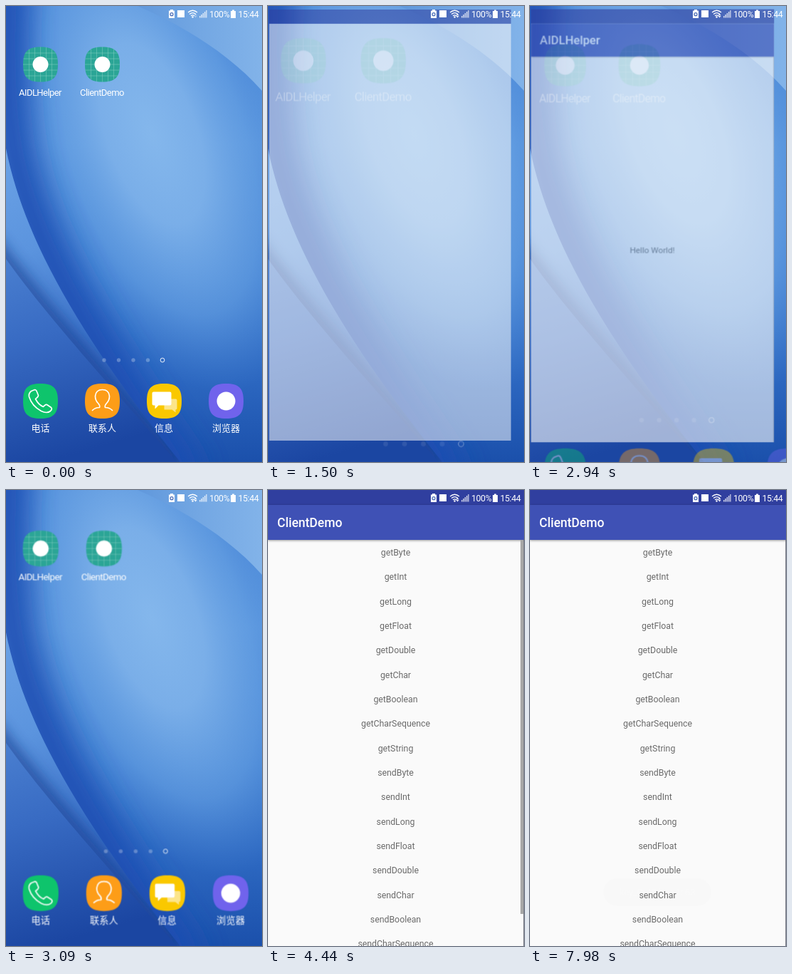
Animation, 360 px wide and 640 px high, one loop 8 s. Source, as an HTML page:

```html
<!DOCTYPE html>
<html lang="zh">
<head>
<meta charset="utf-8">
<title>Phone demo</title>
<style>
html, body { margin: 0; width: 100%; height: 100%; overflow: hidden; background: #2a62b8; }
#stage { position: absolute; left: 0; top: 0; width: 360px; height: 640px; overflow: hidden; font-family: Roboto, sans-serif; }
#stage > svg { position: absolute; left: 0; top: 0; }
text { font-family: Roboto, "Noto Sans CJK SC", "Noto Sans CJK", sans-serif; fill: #fff; }
.label { font-size: 13px; text-anchor: middle; }
.latin { letter-spacing: -.55px; }
.status { font-size: 12.3px; letter-spacing: -.35px; }

.window { position: absolute; inset: 0; background: #fafafa; overflow: hidden; opacity: 0; }
.bar { height: 21px; background: #303f9f; }
.content { position: absolute; top: 21px; left: 0; right: 0; bottom: 0; opacity: 0; }
.toolbar { height: 49px; line-height: 50px; padding-left: 13px; background: #3f51b5; color: #fff;
  font-size: 17.5px; font-weight: 500; box-shadow: 0 1px 3px rgba(0,0,0,.4); }
.item { position: absolute; left: 0; width: 359px; height: 20px; line-height: 20px; text-align: center;
  font-size: 12.3px; color: #6a6a6a; }
.scrollbar { position: absolute; left: 355px; top: 49px; width: 4px; height: 525px; background: #a8a8a8; }
.edge { position: absolute; left: 359px; top: 49px; width: 1px; height: 570px; background: rgba(40,44,60,.55); }
.toast { position: absolute; left: 103px; top: 545px; width: 152px; height: 39px; line-height: 40px;
  border-radius: 20px; background: #636363; color: #fff; text-align: center;
  font-size: 13.4px; letter-spacing: -.4px; white-space: pre; opacity: 0; }

#home, .window, .content, .tap, #arrow { animation: 8s step-end infinite; }
#home { animation-name: home; }
#helper { transform-origin: 30px 91px; animation-name: helper; }
#client { transform-origin: 135px 91px; animation-name: client; }
#helper .content { animation-name: helperContent; }
#client .content { animation-name: clientContent; }
#tap0 { animation-name: tapHelper; }
#tap1 { animation-name: tapClient; }
#arrow { animation-name: arrow; }
.scrollbar { animation: scrollbar 8s linear infinite; }
.toast { animation: toast 8s linear infinite; }

@keyframes arrow { 0% { opacity: .35 } 5.25%, 100% { opacity: 1 } }
@keyframes tapHelper { 0% { opacity: 0 } 15% { opacity: .3 } 15.75%, 100% { opacity: 0 } }
@keyframes tapClient { 0% { opacity: 0 } 45.75% { opacity: .3 } 46.5%, 100% { opacity: 0 } }
@keyframes home {
  0% { transform: none; opacity: 1 }
  18% { transform: matrix(1.12,0,0,1.12,-5,-11); opacity: .8 }
  18.75% { transform: matrix(1.293,0,0,1.296,-13,-29.5); opacity: .34 }
  19.875% { transform: matrix(1.4,0,0,1.4,-18,-38); opacity: 0 }
  36.75% { transform: matrix(1.2,0,0,1.2,-8.8,-15.2); opacity: .4 }
  37.5% { transform: matrix(1.1,0,0,1.1,-4.4,-7.6); opacity: .8 }
  38.625% { transform: matrix(1.0237,0,0,1.0237,-.9,-1.8); opacity: 1 }
  39.375% { transform: none; opacity: 1 }
  48.75% { transform: matrix(1.12,0,0,1.12,-16,-11); opacity: .8 }
  49.5% { transform: matrix(1.293,0,0,1.296,-39,-29.5); opacity: .34 }
  50.25%, 100% { transform: matrix(1.4,0,0,1.4,-54,-38); opacity: 0 }
}
@keyframes helper {
  0% { transform: scale(.8); opacity: 0 }
  18% { transform: scale(.86); opacity: .2 }
  18.75% { transform: scale(.945); opacity: .54 }
  19.875% { transform: scale(.99); opacity: .92 }
  20.625% { transform: none; opacity: 1 }
  36.75% { transform: scale(.95); opacity: .6 }
  37.5% { transform: scale(.88); opacity: .2 }
  38.625%, 100% { transform: none; opacity: 0 }
}
@keyframes client {
  0% { transform: scale(.8); opacity: 0 }
  48.75% { transform: scale(.86); opacity: .2 }
  49.5% { transform: scale(.945); opacity: .54 }
  50.25% { transform: scale(.98); opacity: .82 }
  51% { transform: scale(.995); opacity: .96 }
  52.125%, 100% { transform: none; opacity: 1 }
}
@keyframes helperContent { 0% { opacity: 0 } 22.5% { opacity: .35 } 23.25% { opacity: .75 } 24%, 100% { opacity: 1 } }
@keyframes clientContent { 0% { opacity: 0 } 54% { opacity: .35 } 54.75% { opacity: .75 } 55.5%, 100% { opacity: 1 } }
@keyframes scrollbar { 0%, 71% { opacity: 1 } 74.25%, 100% { opacity: 0 } }
@keyframes toast { 0%, 72% { opacity: 0 } 76.5%, 94.6% { opacity: 1 } 99.8%, 100% { opacity: 0 } }
</style>
</head>
<body>
<div id="stage">
  <svg width="360" height="640">
    <defs>
      <linearGradient id="sky" x1="0" y1="0" x2="0" y2="1">
        <stop offset="0" stop-color="#4a88d8"/><stop offset=".3" stop-color="#5a97df"/>
        <stop offset=".6" stop-color="#4382d3"/><stop offset=".82" stop-color="#2c67c0"/>
        <stop offset="1" stop-color="#1b50ab"/>
      </linearGradient>
      <radialGradient id="glow" gradientUnits="userSpaceOnUse" cx="0" cy="0" r="1"
        gradientTransform="translate(205 180) rotate(-20) scale(180 380)">
        <stop offset="0" stop-color="#84b7ec"/>
        <stop offset=".35" stop-color="#7cb0e9" stop-opacity=".95"/>
        <stop offset=".7" stop-color="#659fe2" stop-opacity=".6"/>
        <stop offset="1" stop-color="#4a84d4" stop-opacity="0"/>
      </radialGradient>
      <linearGradient id="corner">
        <stop offset="0" stop-color="#6098dc"/><stop offset=".5" stop-color="#73a7e3"/>
        <stop offset="1" stop-color="#82b3e9"/>
      </linearGradient>
      <linearGradient id="band" gradientUnits="userSpaceOnUse" x1="0" y1="200" x2="190" y2="640">
        <stop offset="0" stop-color="#6ba2e6"/><stop offset=".3" stop-color="#5b94de"/>
        <stop offset=".6" stop-color="#3c72c9"/><stop offset="1" stop-color="#204fab"/>
      </linearGradient>
      <linearGradient id="fold" x1="0" y1="0" x2=".25" y2="1">
        <stop offset="0" stop-color="#4a7fd0"/><stop offset=".4" stop-color="#386bc3"/>
        <stop offset="1" stop-color="#1b46a2"/>
      </linearGradient>
      <filter id="soft" x="-50%" y="-50%" width="200%" height="200%"><feGaussianBlur stdDeviation="19"/></filter>
      <filter id="tight" x="-50%" y="-50%" width="200%" height="200%"><feGaussianBlur stdDeviation="9"/></filter>
      <clipPath id="bandClip"><path d="M0 200C22 310 85 440 245 640H0Z"/></clipPath>
    </defs>
    <rect width="360" height="640" fill="url(#sky)"/>
    <rect width="360" height="640" fill="url(#glow)"/>
    <path d="M5 -60C-2 50 0 150 12 210C34 320 97 440 255 670" fill="none" stroke="#1a4db2" stroke-width="62" opacity=".9" filter="url(#soft)"/>
    <path d="M185 0C250 28 315 68 360 119V0Z" fill="url(#corner)"/>
    <g clip-path="url(#bandClip)">
      <rect y="190" width="260" height="450" fill="url(#band)"/>
      <path d="M-20 330C50 425 130 510 240 645" fill="none" stroke="#163c90" stroke-width="22" opacity=".65" filter="url(#tight)"/>
    </g>
    <path d="M0 355C55 432 135 520 240 640H0Z" fill="url(#fold)"/>
  </svg>

  <svg width="360" height="640">
    <defs>
      <path id="tile" d="M0-24.5C18-24.500 24.500-18 24.500 0S18 24.500 0 24.500S-24.500 18-24.500 0S-18-24.500 0-24.500Z"/>
      <clipPath id="tileClip"><use href="#tile"/></clipPath>
      <g id="app">
        <use href="#tile" fill="#2ba596"/>
        <path clip-path="url(#tileClip)" fill="none" stroke="#8fd3c8" stroke-opacity=".55" stroke-width=".8"
          d="M-16-25V25M-8-25V25M0-25V25M8-25V25M16-25V25M-25-16H25M-25-8H25M-25 0H25M-25 8H25M-25 16H25"/>
        <circle r="11" fill="#fff"/>
      </g>
    </defs>
    <g id="home">
      <g transform="translate(48.5 82)"><use href="#app"/><use id="tap0" class="tap" href="#tile"/></g>
      <g transform="translate(135.5 82)"><use href="#app"/><use id="tap1" class="tap" href="#tile"/></g>
      <text class="label latin" x="48" y="125.5">AIDLHelper</text>
      <text class="label latin" x="135" y="125.5">ClientDemo</text>

      <g fill="#fff" fill-opacity=".28">
        <circle cx="138" cy="497" r="2.7"/><circle cx="158.5" cy="497" r="2.7"/>
        <circle cx="179" cy="497" r="2.7"/><circle cx="199.5" cy="497" r="2.7"/>
      </g>
      <circle cx="220" cy="497" r="2.9" fill="none" stroke="#fff" stroke-width=".9"/>

      <g fill="none" stroke="#fff" stroke-width="1.7" stroke-linejoin="round" stroke-linecap="round">
        <g transform="translate(48.5 554.5)">
          <use href="#tile" fill="#0ec46c" stroke="none"/>
          <path d="M-13-14L-8-16Q-6-16-5-13L-3-8Q-3-6-7-3Q-3 5 4 8Q7 4 9 5L15 9Q17 11 14 14Q9 18 1 14Q-12 7-16-6Q-17-11-13-14Z"/>
        </g>
        <g transform="translate(135.5 554.5)">
          <use href="#tile" fill="#fd9d18" stroke="none"/>
          <path d="M-14 13Q-10 9-4 9Q-3 6-6 3Q-10-1-10-7Q-9-16 0-16Q9-16 10-7Q10-1 6 3Q3 6 4 9Q10 9 14 13"/>
        </g>
        <g transform="translate(222.5 554.5)" stroke="none">
          <use href="#tile" fill="#fac800"/>
          <path d="M0-3H16Q18-3 18-1V10Q18 12 16 12V16L11 12H0Z" fill="#fce58a"/>
          <path d="M-15-13H8Q10-13 10-11V4Q10 6 8 6H-8L-13 11V6H-15Q-17 6-17 4V-11Q-17-13-15-13Z" fill="#fff"/>
        </g>
        <g transform="translate(309.5 554.5)" stroke="none">
          <use href="#tile" fill="#7063ec"/>
          <circle r="13" fill="#fff"/>
        </g>
      </g>
      <text class="label" x="48.5" y="596.5">电话</text>
      <text class="label" x="135.5" y="596.5">联系人</text>
      <text class="label" x="222" y="596.5">信息</text>
      <text class="label" x="309.5" y="596.5">浏览器</text>
    </g>
  </svg>

  <div id="helper" class="window"></div>
  <div id="client" class="window"></div>
  <div class="toast">key_0: 42 key_1: 63</div>

  <svg width="360" height="22" fill="#fff">
    <path d="M231 5H235V6.5H237V17H229V6.5H231Z"/>
    <circle cx="233" cy="11.7" r="2" fill="none" stroke="#4668b4" stroke-width="1.2"/>
    <rect x="241" y="6" width="10" height="10"/>
    <path d="M256 9Q262.5 3.5 269 9M258 11.5Q262.5 7.8 267 11.5M260 13.8Q262.5 11.8 265 13.8" fill="none" stroke="#fff" stroke-width="1.3"/>
    <circle cx="262.5" cy="15.5" r="1.2"/>
    <path id="arrow" d="M264.5 13.2L266.5 10.5L268.5 13.2ZM264.5 14L266.5 16.5L268.5 14Z"/>
    <path opacity=".75" d="M272 14H273.5V16.5H272ZM274.3 12H275.8V16.5H274.3ZM276.6 10H278.1V16.5H276.6ZM278.9 8H280.4V16.5H278.9ZM281.2 6H282.5V16.5H281.2Z"/>
    <text class="status" x="286" y="16">100%</text>
    <path d="M318 5.5H321V7H323V17H316V7H318Z"/>
    <text class="status" x="326.5" y="16">15:44</text>
  </svg>
</div>
<script>
const item = (name, y) => `<div class="item" style="top:${y - 31}px">${name}</div>`;

function fillWindow(id, title, body) {
  document.getElementById(id).innerHTML = `<div class="bar"></div>
    <div class="content"><div class="toolbar">${title}</div>${body}<div class="edge"></div></div>`;
}

const types = ["Byte", "Int", "Long", "Float", "Double", "Char", "Boolean", "CharSequence", "String"];
const calls = ["get", "send"].flatMap(verb => types.map(type => verb + type)).slice(0, 17);

fillWindow("helper", "AIDLHelper", item("Hello World!", 356));
fillWindow("client", "ClientDemo",
  calls.map((name, i) => item(name, 88 + i * 34.33)).join("") + '<div class="scrollbar"></div>');
</script>
</body>
</html>
```
